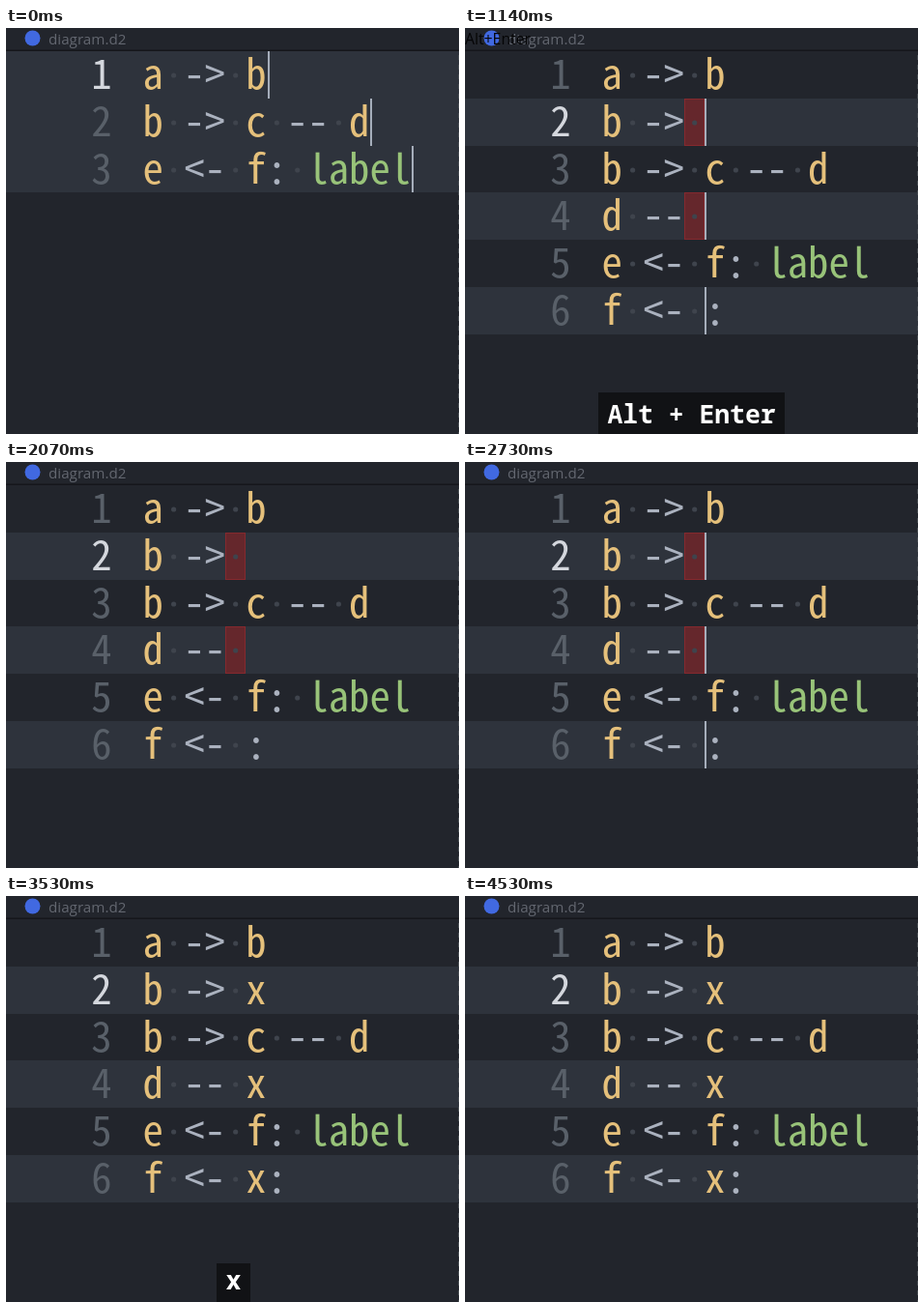
Recreate the animation shown at these times as an HTML page with a canvas. Size 469 px wide and 420 px high, loop 4950 ms.

```html
<!DOCTYPE html>
<html lang="en">
<head>
<meta charset="utf-8">
<title>Editor</title>
<style>
html, body { margin: 0; width: 100%; height: 100%; overflow: hidden; background: #22252c; }
canvas { display: block; }
</style>
</head>
<body>
<canvas id="stage" width="469" height="420"></canvas>
<script>
const ctx = document.getElementById('stage').getContext('2d');
const LOOP = 4950;
const W = 469, H = 420;
const TOP = 24, PITCH = 48.8, LEFT = 141.6, CELL = 21.35;
const MONO = '"Noto Sans Mono CJK JP", "Noto Sans Mono", monospace';
const UI = '"Open Sans", "Noto Sans", sans-serif';
const KEYS = '"Noto Sans Mono", "DejaVu Sans Mono", monospace';

const color = {
  bg: '#22252c', active: '#2e333c', rule: '#15171b',
  name: '#e5c07b', op: '#abb2bf', text: '#98c379',
  number: '#596069', current: '#d4d7dd', dot: '#3f444d',
  title: '#636770', icon: '#4169e1', caret: '#a5adba', key: '#111215'
};

// Pick the font size whose advance fills one cell.
ctx.font = `100px ${MONO}`;
const codeFont = `${CELL / ctx.measureText('a').width * 100}px ${MONO}`;

const rowTop = i => Math.round(TOP + i * PITCH);
const within = (t, a, b) => t >= a && t < b;

function rect(x, y, w, h, fill) {
  ctx.fillStyle = fill;
  ctx.fillRect(x, y, w, h);
}

function disc(x, y, r, fill) {
  ctx.fillStyle = fill;
  ctx.beginPath();
  ctx.arc(x, y, r, 0, Math.PI * 2);
  ctx.fill();
}

function write(str, x, y, font, fill, align = 'left') {
  ctx.font = font;
  ctx.fillStyle = fill;
  ctx.textAlign = align;
  ctx.fillText(str, x, y);
}

function tokenColor(line, i, plain) {
  const colon = line.indexOf(': ');
  if (colon >= 0 && i > colon) return color.text;
  if (line[i] === 'x' && plain) return color.op;
  return /[a-z]/.test(line[i]) ? color.name : color.op;
}

function drawLine(line, row, current, plain) {
  const base = rowTop(row) + 38.5;
  write(row + 1, 99, base, codeFont, current ? color.current : color.number, 'center');
  [...line].forEach((ch, i) => {
    const x = LEFT + (i + 0.5) * CELL;
    if (ch === ' ') disc(x, rowTop(row) + 25, 2.6, color.dot);
    else write(ch, x, base, codeFont, tokenColor(line, i, plain), 'center');
  });
}

function drawHeader(hint) {
  rect(0, 22.5, W, 1.5, color.rule);
  disc(27.5, 10.5, 8, color.icon);
  write('diagram.d2', 44, 17, `15.2px ${UI}`, color.title);
  if (hint) write('Alt+Enter', 0, 17, `15.8px ${UI}`, '#050506');
}

function drawKey(label, x, y, w, base) {
  rect(x, y, w, H - y, color.key);
  write(label, x + w / 2, base, `bold 26.4px ${KEYS}`, '#fff', 'center');
}

function sceneAt(t) {
  if (t < 1140) return {
    lines: ['a -> b', 'b -> c -- d', 'e <- f: label'],
    carets: [271, 377, 420], rows: [0, 1, 2], current: 0,
    caretOn: !within(t, 200, 730)
  };
  const typed = t >= 3000;
  const x = typed ? 'x' : '';
  return {
    lines: ['a -> b', 'b -> ' + x, 'b -> c -- d', 'd -- ' + x, 'e <- f: label', `f <- ${x}:`],
    carets: Array(3).fill(typed ? 271 : 248), rows: [1, 3, 5], current: 1,
    caretOn: !(within(t, 1410, 1540) || within(t, 2070, 2730) ||
               within(t, 3530, 4000) || t >= 4530),
    trailing: typed ? [] : [1, 3]
  };
}

function draw(t) {
  const s = sceneAt(t);
  rect(0, 0, W, H, color.bg);
  for (const r of s.rows) rect(0, rowTop(r), W, rowTop(r + 1) - rowTop(r), color.active);
  for (const r of s.trailing || []) {
    const y = rowTop(r), h = rowTop(r + 1) - y;
    rect(227, y, 21, h, '#85292e');
    rect(228, y + 1, 19, h - 2, '#65272c');
  }
  s.lines.forEach((line, i) =>
    drawLine(line, i, i === s.current, i !== 1 && t < 3070));
  if (s.caretOn) s.rows.forEach((r, i) =>
    rect(s.carets[i], rowTop(r), 2, rowTop(r + 1) - rowTop(r), color.caret));

  for (let y = 28; y < H; y += 10) rect(W - 1, y, 1, 5, '#41474c');
  drawHeader(within(t, 1140, 1210));
  if (within(t, 1140, 2070)) drawKey('Alt + Enter', 138, 377, 193, 408.5);
  if (within(t, 3000, 3930)) drawKey('x', 218, 380, 35, 407);
}

const start = performance.now();
function frame() {
  draw((performance.now() - start) % LOOP);
  requestAnimationFrame(frame);
}
draw(0);
requestAnimationFrame(frame);
</script>
</body>
</html>
```
